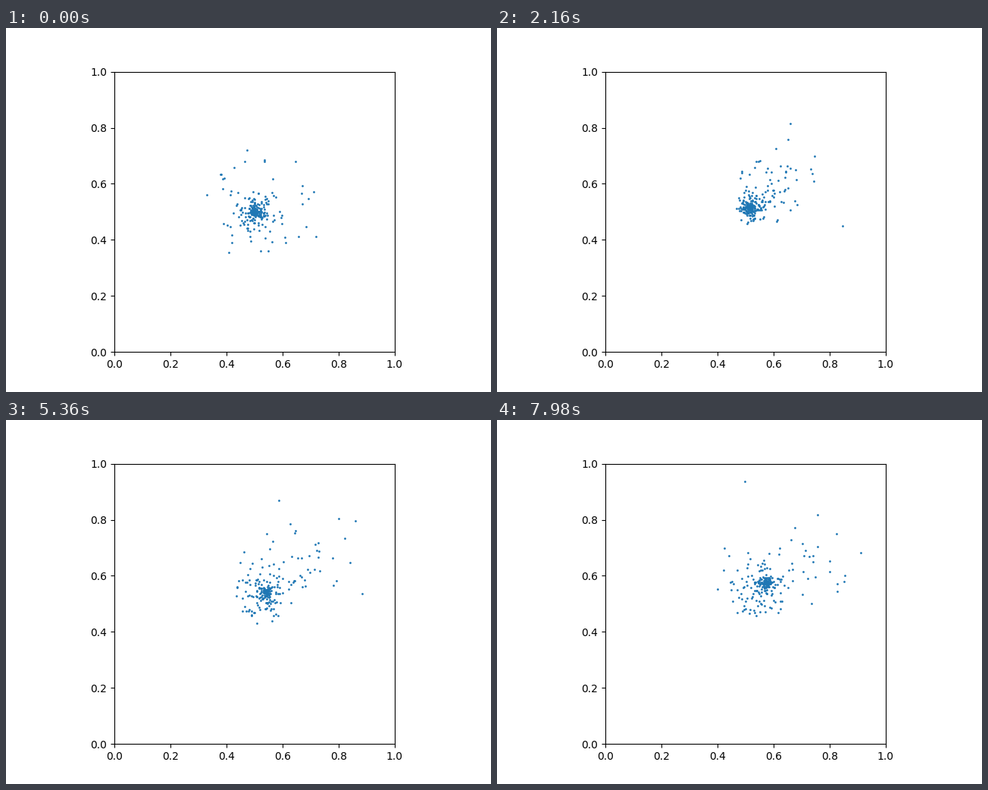
Write a matplotlib script that moves like this. It is 640 by 480 pixels and loops after 8000 ms.

```python
import numpy as np
import matplotlib.pyplot as plt
from matplotlib.animation import FuncAnimation

FRAMES, STEP = 400, 20
KNOTS = np.array([0, 2.16, 5.36, 7.98])
rng = np.random.default_rng(11)

# The three widest orbits, at the knot times
WIDE = np.array([
    [(.472, .720), (.660, .815), (.860, .796), (.910, .682)],
    [(.720, .413), (.847, .450), (.883, .535), (.800, .614)],
    [(.685, .447), (.678, .650), (.587, .868), (.497, .937)],
])


def cubic(points, t):
    """Cubic through four points; the knot axis is second to last."""
    weights = [np.prod([(t - b) / (a - b) for b in KNOTS if b != a])
               for a in KNOTS]
    return np.einsum('k,...kd->...d', np.array(weights), points)


def cloud(n, means, spreads, spin, reach=2):
    """Star paths for a cloud that drifts, swells and turns."""
    radius = np.minimum(rng.gamma(2, .6, n), reach * rng.uniform(.8, 1, n))
    angle = (rng.uniform(0, 2 * np.pi, (n, 1))
             + rng.normal(0, spin, (n, 1)) * KNOTS)
    unit = np.stack([np.cos(angle), np.sin(angle)], axis=-1)
    scale = radius[:, None] * np.array(spreads)
    return np.array(means) + scale[..., None] * unit


paths = np.vstack([
    # arm thrown to the upper right
    cloud(28, [(.53, .53), (.64, .63), (.73, .675), (.745, .66)],
          [.095, .065, .075, .082], .2),
    # loose halo
    cloud(32, [(.49, .51), (.56, .56), (.55, .595), (.53, .585)],
          [.105, .07, .08, .08], .22),
    # inner swarm
    cloud(60, [(.5, .5), (.53, .525), (.525, .53), (.545, .545)],
          [.038, .03, .052, .056], .25),
    WIDE,
])

# Tight core: small ellipses around the moving centre
CORE = 125
size = rng.gamma(1.6, .55, (CORE, 2))
phase = rng.uniform(0, 2 * np.pi, (CORE, 2))
speed = rng.normal(0, 1.6, (CORE, 1))


def stars(t):
    centre = .499 + .005 * t + .00055 * t ** 2
    swell = .016 + .003 * np.cos(2 * np.pi * t / 2.6)
    core = centre + swell * size * np.cos(speed * t + phase)
    return np.vstack([core, cubic(paths, t)])


fig, ax = plt.subplots(figsize=(6.4, 4.8), dpi=100)
ax.set(xlim=(0, 1), ylim=(0, 1), aspect='equal')
dots, = ax.plot([], [], 'o', color='C0', markersize=1)


def update(frame):
    dots.set_data(*stars(frame * STEP / 1000).T)
    return dots,


anim = FuncAnimation(fig, update, frames=FRAMES, interval=STEP,
                     repeat=True, repeat_delay=0)
plt.show()
```
